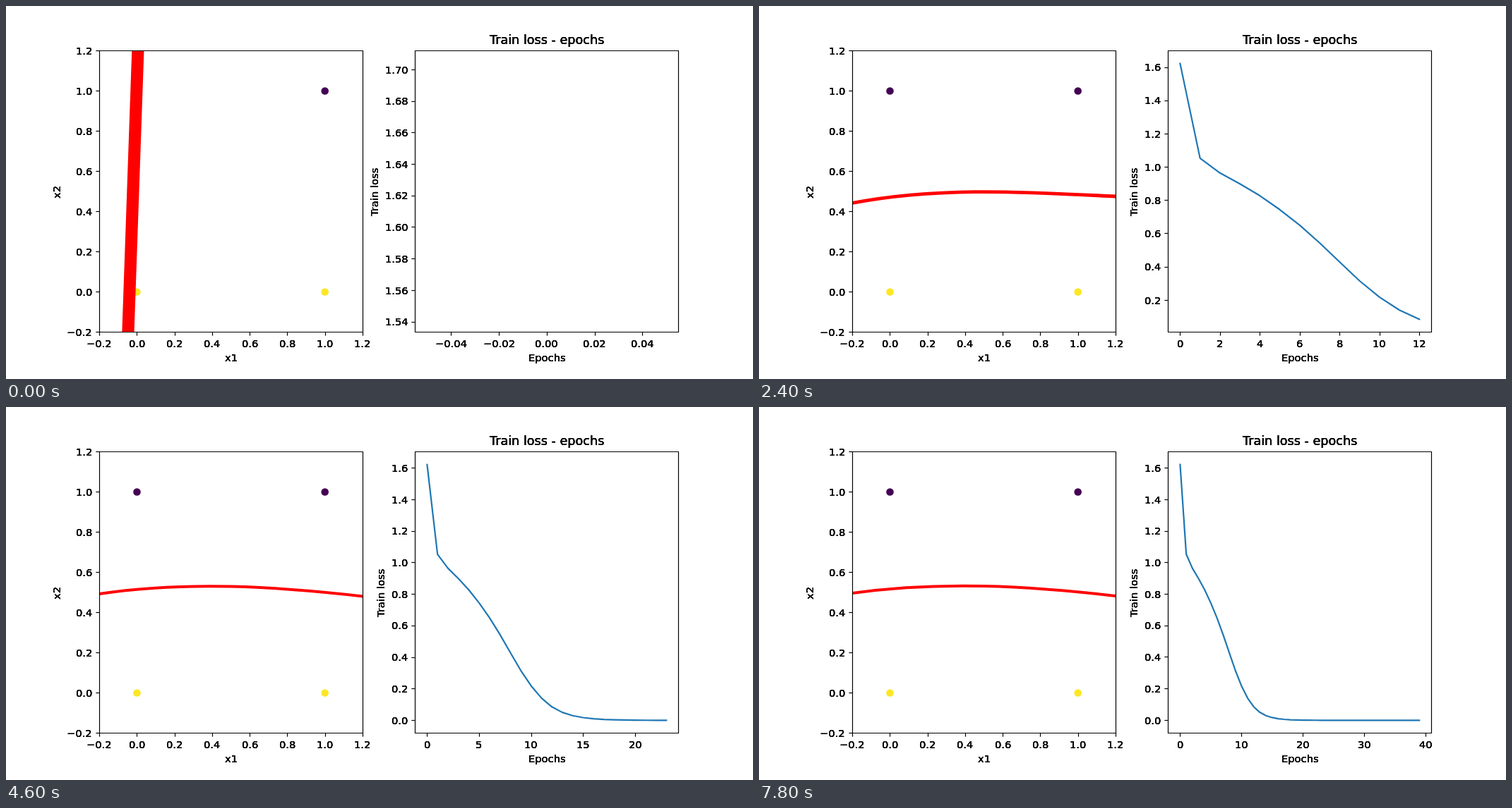
An HTML page with a canvas that plays this animation: 1058x529 px, repeating every 8 s.

```html
<!DOCTYPE html>
<html lang="en">
<head>
<meta charset="utf-8">
<title>Train loss - epochs</title>
<style>
  html, body { margin: 0; height: 100%; overflow: hidden; background: #fff; }
  canvas { display: block; }
</style>
</head>
<body>
<canvas id="stage" width="1058" height="529"></canvas>
<script>
const ctx = document.getElementById('stage').getContext('2d');
const EPOCHS = 40, STEP_MS = 200;
const PT = 1058 / 720;                    // pixels per point on a 10 inch wide figure
const TOP = 63.5, BOTTOM = 462.5, WIDTH = 372.7;
const LEFT_PLOT = 132.25, RIGHT_PLOT = 579.49;

const losses = [1.6228, 1.054, 0.9652, 0.8998, 0.8285, 0.745, 0.651,
                0.545, 0.4305, 0.317, 0.219, 0.141, 0.0856];
while (losses.length < EPOCHS) losses.push(losses.at(-1) * 0.59);

// Decision boundary: epoch, four Bezier heights, stroke width
const boundary = [
  [1, 115, 210, 295, 350, 25],
  [4, 155, 216, 279, 327, 20],
  [12, 279.5, 255.6, 264, 270, 4.8],
  [19, 268, 249, 258, 269.5, 4.1],
  [23, 265, 246.5, 254.5, 268.5, 4],
  [31, 264, 246.5, 253.5, 268, 4],
  [39, 264, 246.5, 253.5, 268, 4],
];

const snapX = v => Math.round(v) + 0.5;
const snapY = v => Math.floor(v + 0.01) + 0.5;
const lerp = (a, b, k) => a + (b - a) * k;

// Text on whole pixels; align is the share of the width left of x
function text(str, x, y, { size = 10, align = 0.5, turned = false } = {}) {
  ctx.save();
  ctx.font = `${size * PT}px "DejaVu Sans", sans-serif`;
  ctx.fillStyle = '#000';
  const width = ctx.measureText(str).width;
  const shift = align * width;
  ctx.translate(Math.round(turned ? x : x - shift), Math.round(turned ? y + shift : y));
  if (turned) ctx.rotate(-Math.PI / 2);
  for (let pass = 0; pass < 4; pass++) ctx.fillText(str, 0, 0);   // firmer edges
  ctx.restore();
  return width;
}

function line(x1, y1, x2, y2) {
  ctx.beginPath();
  ctx.moveTo(x1, y1);
  ctx.lineTo(x2, y2);
  ctx.stroke();
}

// Round tick values: the smallest nice step that gives at most `bins` intervals
function ticks([lo, hi], bins) {
  const raw = (hi - lo) / bins;
  const power = 10 ** Math.floor(Math.log10(raw));
  const factor = [1, 2, 2.5, 5, 10].find(f => f * power >= raw - 1e-9);
  const step = +(factor * power).toFixed(6);
  const decimals = (String(step).split('.')[1] || '').length;
  const result = [];
  for (let i = Math.ceil(lo / step - 1e-6); i <= hi / step + 1e-6; i++) {
    const label = Math.abs(i * step).toFixed(decimals);
    result.push({ value: i * step, label: (i < 0 ? '\u2212' : '') + label });
  }
  return result;
}

function makePlot(left, xRange, yRange) {
  return {
    left, xRange, yRange,
    x: v => left + WIDTH * (v - xRange[0]) / (xRange[1] - xRange[0]),
    y: v => BOTTOM - (BOTTOM - TOP) * (v - yRange[0]) / (yRange[1] - yRange[0]),
  };
}

function drawAxes(plot, xLabel, yLabel) {
  const { left, xRange, yRange } = plot;
  const tick = 3.5 * PT, middle = left + WIDTH / 2;
  ctx.strokeStyle = '#000';
  ctx.lineWidth = 1.2;
  const x0 = snapX(left), x1 = snapX(left + WIDTH);
  ctx.strokeRect(x0, TOP, x1 - x0, BOTTOM - TOP);
  for (const { value, label } of ticks(xRange, 8)) {
    const x = snapX(plot.x(value));
    line(x, BOTTOM, x, BOTTOM + tick);
    text(label, plot.x(value), 484);
  }
  let widest = 0;
  for (const { value, label } of ticks(yRange, 9)) {
    const y = snapY(plot.y(value));
    line(x0, y, x0 - tick, y);
    widest = Math.max(widest, text(label, left - 2 * tick, plot.y(value) + 5.2, { align: 1 }));
  }
  text(xLabel, middle, 504);
  text(yLabel, left - 2 * tick - widest - 9.4, (TOP + BOTTOM) / 2 + 1, { turned: true });
}

function drawBoundary(n) {
  ctx.strokeStyle = '#f00';
  if (n === 0) {
    ctx.lineWidth = 17.2;
    line(172.6, BOTTOM + 10, 187.2, TOP - 10);
    return;
  }
  const i = Math.max(1, boundary.findIndex(key => key[0] >= n));
  const a = boundary[i - 1], b = boundary[i];
  const k = (n - a[0]) / (b[0] - a[0]);
  const [y0, y1, y2, y3] = [1, 2, 3, 4].map(j => lerp(a[j], b[j], k));
  ctx.lineWidth = 1 / lerp(1 / a[5], 1 / b[5], k);
  const third = WIDTH / 3, right = LEFT_PLOT + WIDTH;
  ctx.beginPath();
  ctx.moveTo(LEFT_PLOT - 20, y0 - (y1 - y0) * 20 / third);
  ctx.lineTo(LEFT_PLOT, y0);
  ctx.bezierCurveTo(LEFT_PLOT + third, y1, right - third, y2, right, y3);
  ctx.lineTo(right + 20, y3 + (y3 - y2) * 20 / third);
  ctx.stroke();
}

function drawClassifier(n) {
  const plot = makePlot(LEFT_PLOT, [-0.2, 1.2], [-0.2, 1.2]);
  for (const x of [0, 1]) for (const y of [0, 1]) {
    ctx.fillStyle = y ? '#440154' : '#fde725';
    ctx.beginPath();
    ctx.arc(plot.x(x), plot.y(y), 5.3, 0, 2 * Math.PI);
    ctx.fill();
  }
  ctx.save();
  ctx.beginPath();
  ctx.rect(LEFT_PLOT, TOP, WIDTH, BOTTOM - TOP);
  ctx.clip();
  drawBoundary(n);
  ctx.restore();
  drawAxes(plot, 'x1', 'x2');
}

function drawLoss(n) {
  const first = losses[0], last = losses[n];
  const margin = (first - last) * 0.05;
  const plot = n
    ? makePlot(RIGHT_PLOT, [-0.05 * n, 1.05 * n], [last - margin, first + margin])
    : makePlot(RIGHT_PLOT, [-0.055, 0.055], [first * 0.945, first * 1.055]);
  ctx.strokeStyle = '#1f77b4';
  ctx.lineWidth = 1.5 * PT;
  ctx.lineJoin = 'round';
  ctx.lineCap = 'square';
  ctx.beginPath();
  if (n) for (let i = 0; i <= n; i++) ctx.lineTo(plot.x(i), plot.y(losses[i]));
  ctx.stroke();
  ctx.lineCap = 'butt';
  drawAxes(plot, 'Epochs', 'Train loss');
  text('Train loss - epochs', RIGHT_PLOT + WIDTH / 2, 54, { size: 12 });
}

function draw(now) {
  const n = Math.floor(now / STEP_MS) % EPOCHS;
  ctx.fillStyle = '#fff';
  ctx.fillRect(0, 0, 1058, 529);
  drawClassifier(n);
  drawLoss(n);
}

const start = performance.now();
function loop() {
  draw(performance.now() - start);
  requestAnimationFrame(loop);
}
loop();
</script>
</body>
</html>
```
